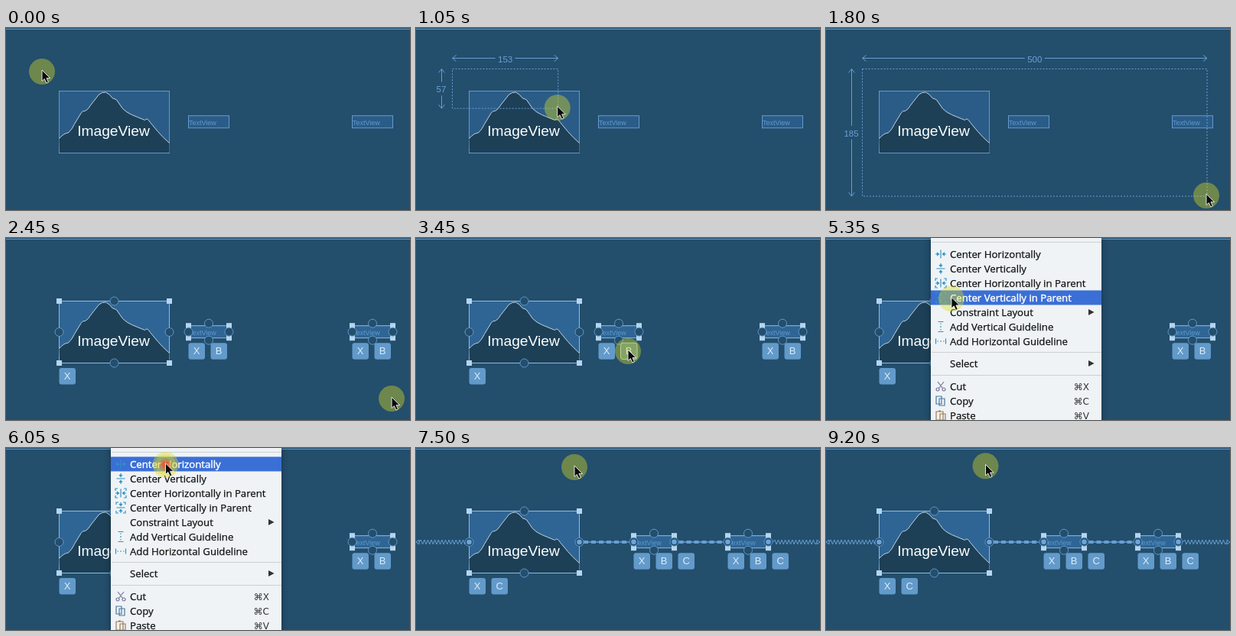
Animation, 528 px wide and 238 px high, one loop 9400 ms. Source, as an HTML page:

```html
<!DOCTYPE html>
<html lang="en">
<head>
<meta charset="utf-8">
<title>Centering a chain in a layout editor</title>
<style>
  html, body { margin: 0; width: 100%; height: 100%; overflow: hidden; background: #234e6c; }
  svg { display: block; width: 100%; height: 100%; }
  text { font-family: "Liberation Sans", Arial, sans-serif; white-space: pre; }
  .view { fill: #2b5c88; stroke: #6499cc; }
  .selected .view { fill: #2f6594; stroke: #8dbbe6; }
  .rock { fill: #1d4057; }
  .ridge { fill: none; stroke: #c3d3df; }
  .title { fill: #fff; font-size: 19.2px; text-anchor: middle; }
  .caption { fill: #5e98cb; font-size: 9px; }
  .handles, .c, .dot { display: none; }
  .selected .handles, .chained .c, .chained .joined .dot { display: inline; }
  .corner { fill: #b5d5f0; }
  .anchor { fill: #234e6c; stroke: #6097ca; }
  .dot { fill: #6da4d9; }
  .badge rect { fill: #629aca; }
  .badge text { fill: #dcebf7; font-size: 13px; text-anchor: middle; }
  .hover rect { fill: #477f95; stroke: #a4c9e6; }
  .wire { fill: none; stroke: #679fd3; }
  .measure text { fill: #6ba2d6; font-size: 11.5px; text-anchor: middle; }
  .menu { filter: drop-shadow(0 3px 4px rgba(0, 0, 0, .35)); }
  .menu text {
    font-family: "Open Sans", "Noto Sans", sans-serif; font-size: 13.2px;
    fill: #111; stroke: #111; stroke-width: .25px;
  }
  .menu .keys { font-family: "DejaVu Sans", sans-serif; font-size: 12px; text-anchor: end; fill: #333; stroke: none; }
  .menu .active text { fill: #fff; stroke: #fff; stroke-width: .45px; }
  .icon { fill: none; stroke-width: 1.2; }
</style>
</head>
<body>
<svg id="stage" viewBox="0 0 528 238" preserveAspectRatio="none">
  <defs>
    <radialGradient id="glow">
      <stop offset=".45" stop-color="#f4562f" stop-opacity=".85"/>
      <stop offset="1" stop-color="#f08a2c" stop-opacity=".35"/>
    </radialGradient>
  </defs>
  <rect y="1" width="528" height="1" fill="#5f97cb"/>
  <g id="wires" class="wire">
    <path id="springs"/>
    <path id="links" stroke-width="1.5"/>
    <path id="beads" stroke-width="4" stroke-dasharray="6 4"/>
  </g>
  <g id="image"></g>
  <g id="first"></g>
  <g id="second"></g>
  <g id="measure" class="measure">
    <rect id="marquee" x="47.5" y="53.5" class="wire" stroke-dasharray="2 2"/>
    <path id="rulers" class="wire"/>
    <text id="across" y="45"></text>
    <text id="down" x="33"></text>
  </g>
  <g id="menu" class="menu">
    <rect x="137" y="-5" width="223" height="250" fill="#eff3f6"/>
    <path d="M138 5.5H360M138 149.5H360M138 179.5H360" stroke="#cdd1d4"/>
    <rect id="bar" x="137" width="223" height="19" fill="#3a6fd6"/>
  </g>
  <g id="pointer">
    <circle id="halo" r="17" fill="#dcdc1e" opacity=".4"/>
    <circle id="ring" fill="none" stroke="#e2d51f"/>
    <circle id="press" fill="url(#glow)"/>
    <path d="M0-2V12.5L3.3 9.6L5.8 15L8.4 13.8L6 8.6H10.6Z" fill="#0b0b0b" stroke="#f4f4f4" stroke-width=".9"/>
  </g>
</svg>
<script>
const $ = id => document.getElementById(id);
const LOOP = 9400, STEP = 50, MID = 123;

const set = (node, attrs) => {
  for (const name in attrs) node.setAttribute(name, attrs[name]);
};
const show = (id, on) => { $(id).style.display = on ? "" : "none"; };
const clamp = v => Math.min(1, Math.max(0, v));
const progress = (t, from, to) => clamp((t - from) / (to - from));
const smooth = p => p * p * (3 - 2 * p);
const easeIn = p => p ** 1.5;
const easeOut = p => 1 - (1 - p) ** 1.5;
const mix = (a, b, p) => a + (b - a) * p;

// Selection handles and anchors around a box.
const corner = (x, y) => `<rect class="corner" x="${x - 3.5}" y="${y - 3.5}" width="7" height="7"/>`;
const anchor = (x, y, side = "") => `<g class="${side}"><circle class="anchor" cx="${x}" cy="${y}" r="5.5"/>
  <circle class="dot" cx="${x}" cy="${y}" r="3.3"/></g>`;
const badge = (x, y, letter) => `<g class="badge ${letter.toLowerCase()}">
  <rect x="${x}" y="${y}" width="21.5" height="21.5" rx="3"/>
  <text x="${x + 10.7}" y="${y + 15.2}">${letter}</text></g>`;

function handles(w, h, letters, out) {
  const corners = [[0, 0], [w, 0], [0, h], [w, h]].map(p => corner(...p)).join("");
  const anchors = anchor(w / 2, -out) + anchor(w / 2, h + out) +
    anchor(0, h / 2, "joined") + anchor(w, h / 2, "joined");
  const badges = [...letters].map((l, i) => badge(i * 29, h + 6.5, l)).join("");
  return `<g class="handles">${corners}${anchors}${badges}</g>`;
}

const ridge = "0 62Q6 55 12 54.5Q17 50 20 43L28.5 29Q31 25 34 26Q38 24 41 18.5L52 4.5Q56 1 61 1.5" +
  "Q66 4 70 9.5Q73 10 75 11.5L83 23Q88 28 95 31L112 38Q115 34 119 41L129 53Q135 60 144 68";
$("image").innerHTML = `<rect class="view" width="144" height="81"/>
  <path class="rock" d="M${ridge}V80.5H.5Z"/><path class="ridge" d="M${ridge}"/>
  <text class="title" x="71" y="58.7">ImageView</text>${handles(144, 81, "XC", 0)}`;
set($("image"), { transform: "translate(69.5 82.5)" });

for (const id of ["first", "second"])
  $(id).innerHTML = `<rect class="view" width="53" height="16"/>
    <text class="caption" x=".5" y="12">TextView</text>${handles(53, 16, "XBC", 3)}`;

const arrowsIn = "M-7 0H-3M7 0H3M-4.5-1.5L-2.5 0L-4.5 1.5ZM4.5-1.5L2.5 0L4.5 1.5ZM0-5.5V5.5";
const brackets = "M-4-6H-7V-3M4-6H7V-3M-4 6H-7V3M4 6H7V3";
const beam = "M-3.5-6.5H3.5M-3.5 6.5H3.5M0-4.5V-3M0-1V1M0 3V4.5";
const TEAL = "#2f93c4";
const items = [
  [21, "Center Horizontally", arrowsIn],
  [40, "Center Vertically", arrowsIn, 90],
  [59, "Center Horizontally in Parent", arrowsIn + brackets],
  [78, "Center Vertically in Parent", arrowsIn + brackets, 90],
  [97, "Constraint Layout", "", 0, "▶"],
  [116, "Add Vertical Guideline", beam],
  [135, "Add Horizontal Guideline", beam, 90],
  [164, "Select", "", 0, "▶"],
  [194, "Cut", "M-4-6L3 3M4-6L-3 3M-6 4A2 2 0 1 0-2 4A2 2 0 1 0-6 4M2 4A2 2 0 1 0 6 4A2 2 0 1 0 2 4", 0, "⌘X", "#77739a"],
  [213, "Copy", "M-6-6H1V4H-6ZM-2-3H5V6H-2Z", 0, "⌘C", "#47799f"],
  [232, "Paste", "M-6-5H3V6H-6ZM-3-6H0M-1-2H6V6H-1Z", 0, "⌘V", "#a07c4c"]
];
const rows = items.map(([y, label, icon, turn = 0, end = "", color = TEAL]) => {
  const row = document.createElementNS("http://www.w3.org/2000/svg", "g");
  const tail = end === "▶"
    ? `<path d="M343 ${y - 4}V${y + 4}L350.5 ${y}Z" fill="#333"/>`
    : `<text class="keys" x="344" y="${y + 4.5}">${end}</text>`;
  row.innerHTML = `<path class="icon" stroke="${color}" d="${icon}"
    transform="translate(150 ${y}) rotate(${turn})"/><text x="162" y="${y + 4.5}">${label}</text>${tail}`;
  $("menu").append(row);
  return row;
});

// time, x, y, easing used to arrive there
const route = [
  [0, 47, 57], [250, 47, 53, smooth], [450, 47, 53],
  [1350, 300, 147, easeIn], [1800, 497, 219, easeOut], [2300, 504, 210, smooth],
  [3000, 504, 210], [3450, 277, 148, easeIn], [3850, 137, 114, easeOut],
  [5100, 137, 114], [5700, 208.5, 22, smooth], [6250, 208.5, 22],
  [6600, 208.5, 23.5, smooth], [7499, 208.5, 23.5], [7500, 207, 25],
  [9049, 207, 25], [9050, 208.5, 23.5], [LOOP, 208.5, 23.5]
];
function pointerAt(t) {
  const i = Math.max(1, route.findIndex(k => k[0] >= t));
  const [t0, x0, y0] = route[i - 1], [t1, x1, y1, ease = p => p] = route[i];
  const p = ease(progress(t, t0, t1));
  return [mix(x0, x1, p), mix(y0, y1, p)];
}

function spring(from, to) {
  let d = `M${from} ${MID}`;
  for (let x = from + 2.3, up = 1; x < to; x += 2.3, up = -up) d += `L${x} ${MID - 3 * up}`;
  return d + `L${to} ${MID}`;
}

function ruler(length, point, label) {
  const gap = Math.min(label, length / 2), mid = length / 2;
  const line = (...pts) => pts.map((p, i) => (i ? "L" : "M") + point(...p)).join("");
  const tip = Math.min(5, mid);
  return line([0, 0], [mid - gap, 0]) + line([mid + gap, 0], [length, 0]) +
    line([tip, -4], [0, 0], [tip, 4]) + line([length - tip, -4], [length, 0], [length - tip, 4]);
}

function drawMeasure(x, y) {
  const w = Math.max(0, x - 46.5), h = Math.max(0, y - 52.5);
  set($("marquee"), { width: w, height: h });
  set($("rulers"), {
    d: ruler(w, (a, b) => `${47.5 + a} ${39.5 + b}`, 13) + ruler(h, (a, b) => `${33.5 + b} ${53.5 + a}`, 9)
  });
  set($("across"), { x: 47.5 + w / 2 });
  set($("down"), { y: 58.3 + h / 2 });
  $("across").textContent = Math.round(w * 1.11);
  $("down").textContent = Math.round(h * 1.11);
}

function drawChain(t) {
  const p = smooth(progress(t, 6200, 6600));
  const a = mix(238.5, 284.5, p), b = mix(452.5, 407.5, p);
  set($("first"), { transform: `translate(${a} 114.7)` });
  set($("second"), { transform: `translate(${b} 114.7)` });
  const link = `M219 ${MID}H${a - 6}M${a + 59} ${MID}H${b - 6}`;
  set($("links"), { d: link });
  set($("beads"), { d: link });
  set($("springs"), {
    d: spring(4, 64) + spring(b + 59, 524) +
      `M4 ${MID - 3}L0 ${MID}L4 ${MID + 3}ZM524 ${MID - 3}L528 ${MID}L524 ${MID + 3}Z`
  });
}

function drawPointer(t, x, y) {
  const right = t >= 4500 && t < 5000, left = t >= 5850 && t < 6250;
  const pulse = Math.sin(Math.PI * (right ? progress(t, 4450, 5050) : progress(t, 5800, 6300)));
  const width = 5 * pulse;
  set($("pointer"), { transform: `translate(${x} ${y})` });
  show("ring", right || left);
  show("press", left);
  set($("ring"), { r: right ? 15.5 - width / 2 : 11, "stroke-width": width, opacity: right ? .85 : .3 });
  set($("press"), { r: 8 * pulse });
}

function render(t) {
  const [x, y] = pointerAt(t);
  const dragging = t >= 450 && t < 2450, menuOpen = t >= 4600 && t < 6200, chained = t >= 6200;
  $("stage").classList.toggle("selected", t >= 2450);
  $("stage").classList.toggle("chained", chained);
  show("measure", dragging);
  show("menu", menuOpen);
  show("wires", chained);
  if (dragging) drawMeasure(x, y);
  drawChain(t);

  const over = !chained && t > 3000 && x > 266 && x < 290 && y > 137 && y < 160;
  $("first").querySelector(".b").classList.toggle("hover", over);

  const active = items.findIndex(([rowY]) => Math.abs(rowY - y) <= 9.5);
  rows.forEach((row, i) => row.classList.toggle("active", i === active));
  show("bar", active >= 0);
  if (active >= 0) set($("bar"), { y: items[active][0] - 9.5 });
  drawPointer(t, x, y);
}

const start = performance.now();
function tick() {
  const t = (performance.now() - start) % LOOP;
  render(Math.floor(t / STEP) * STEP);
  requestAnimationFrame(tick);
}
tick();
</script>
</body>
</html>
```
